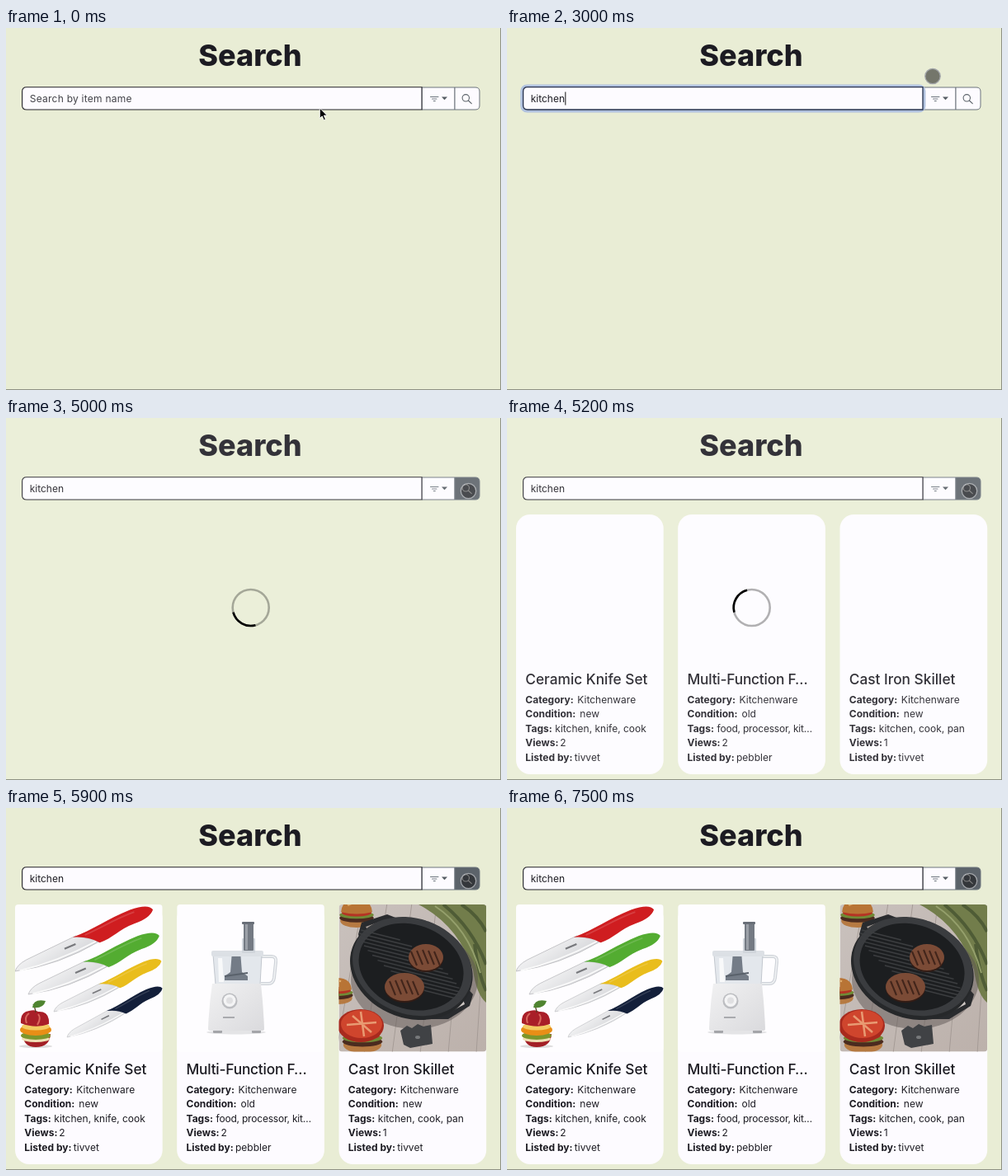
An HTML page that plays this animation: 600 by 439 pixels, repeating every 7600 ms.

```html
<!DOCTYPE html>
<html lang="en">
<head>
<meta charset="utf-8">
<title>Search</title>
<style>
  html, body { margin: 0; width: 100%; height: 100%; overflow: hidden; background: #e9edd5; }
  svg { display: block; width: 600px; height: 439px; font: 12px Inter, "Open Sans", sans-serif; fill: #1c1b22; }
  .heading { font-size: 36px; font-weight: 800; }
  .title { font-size: 17.3px; font-weight: 500; }
  .label { font-weight: 650; }
  .tight { letter-spacing: -.2px; }
</style>
</head>
<body>
<svg id="stage" viewBox="0 0 600 439" xmlns="http://www.w3.org/2000/svg"></svg>
<script>
const LOOP = 7600, STEP = 100;
const FOCUS = 500, SUBMIT = 3500, RESULTS = 5100, LOADED = 5400;
const typing = [[1600, 'k'], [1900, 'ki'], [2300, 'kit'], [2400, 'kitc'], [2500, 'kitch'], [2600, 'kitche'], [2800, 'kitchen']];

const path = (d, fill, extra = '') => `<path d="${d}" fill="${fill}" ${extra}/>`;
const line = (d, stroke, width, extra = '') => path(d, 'none', `stroke="${stroke}" stroke-width="${width}" ${extra}`);
const rect = (x, y, w, h, fill, extra = '') => `<rect x="${x}" y="${y}" width="${w}" height="${h}" fill="${fill}" ${extra}/>`;
const oval = (x, y, rx, ry, fill, extra = '') => `<ellipse cx="${x}" cy="${y}" rx="${rx}" ry="${ry}" fill="${fill}" ${extra}/>`;
const text = (x, y, value, extra = '') => `<text x="${x}" y="${y}" ${extra}>${value}</text>`;
const group = (id, body, extra = '') => `<g id="${id}" ${extra}>${body}</g>`;

// Knife pointing left, 100 units long, tip at the origin.
function knife(x, y, length, angle, color) {
  return `<g transform="translate(${x} ${y}) rotate(${angle}) scale(${length / 100})">` +
    path('M0 0Q3 -3.5 10 -4L46 -5.5L60 4Q28 8 0 0Z', 'url(#steel)', 'stroke="#b9babd" stroke-width=".4"') +
    line('M3 .8Q28 5.5 57 3.2', '#fafafa', 1) +
    rect(36, -1.2, 8, 1.2, '#77787c') +
    path('M44 -5.5C58 -4.5 70 -7.5 86 -7Q99 -6 100 -1Q96 3.5 85 2.5C74 2 68 5.5 59 5Q54 -2 44 -5.5Z', color) +
    line('M52 -3.6C65 -3.6 75 -5.5 88 -4.5', '#fff', 1, 'opacity=".15"') + '</g>';
}

function knives() {
  const fruit =
    oval(36, 289, 20, 2, '#ddd') +
    path('M20 274H54Q53 290 36 290Q21 290 20 274Z', '#a32026') +
    oval(36, 280, 17, 4, '#efdfb4') +
    oval(36, 276, 18, 5, '#7d962c') +
    oval(36, 269, 19, 7, '#e98e16') +
    oval(36, 265, 17, 4.5, '#f3cb62') +
    path('M18 261Q17 247 28 246Q35 244 39 247Q53 246 52 262Q36 268 18 261Z', '#a91f28') +
    line('M25 261Q22 253 28 249M38 263Q43 255 39 250', '#d9675c', 2) +
    line('M36 248Q35 241 33 238', '#553a20', 1.3) +
    path('M32 242Q33 231 48 234Q45 244 32 242Z', '#4f8430');
  return knife(11, 198, 183, -23.5, '#cf1d20') + knife(27, 226, 174, -23.5, '#53ac31') +
    knife(58, 247, 144, -24.5, '#e9bd1c') + knife(74, 278, 130, -26.5, '#131f3a') + fruit;
}

function processor() {
  return oval(279, 272, 36, 2.5, '#e4e4e6') +
    line('M308 180H322Q328 180 327 187L325 206Q324 213 318 213H309', '#cfd3d9', 4) +
    line('M308 180H322Q328 180 327 187L325 206Q324 213 318 213H309', '#f1f3f5', 1.6) +
    path('M251 178H310L308 214H254Z', '#e3e7ec', 'stroke="#c2c7ce"') +
    path('M257 182H262L264 211H258Z', '#f8f9fa') +
    path('M274 174H284L286 199L293 204V209H265V204L272 199Z', '#747c87') +
    line('M265 204L293 200', '#59616b', 2) +
    rect(249, 173, 63, 7, '#dce0e5', 'rx="2"') +
    rect(286, 158, 16, 18, '#d0d5db', 'rx="1"') +
    rect(288, 139, 12, 34, '#747a83', 'rx="1"') +
    rect(290, 141, 3, 31, '#9ba0a8') + rect(286, 138, 15, 3, '#686e77', 'rx="1"') +
    rect(251, 268, 11, 5, '#a4a5a9', 'rx="1"') + rect(298, 268, 11, 5, '#a4a5a9', 'rx="1"') +
    path('M250 213H309Q312 240 313 268Q313 270 310 270H248Q245 270 245 268Q246 240 250 213Z', 'url(#plastic)') +
    oval(271, 234, 9.5, 9.5, '#bcbdc1') + oval(271, 233.5, 7.5, 7.5, '#f4f4f5') + oval(271, 233.5, 4, 4, '#e0e0e2') +
    rect(263, 253, 14, 2, '#a9aaae');
}

function burger(x, y, s) {
  return `<g transform="translate(${x} ${y}) scale(${s})">` +
    oval(0, 10, 22, 9, '#b67a42') + oval(0, 6, 23, 6, '#4b2b1f') + oval(0, 2, 23, 5, '#708a36') +
    oval(0, -1, 20, 5, '#b53424') + path('M-21 -2Q-20 -19 0 -19Q20 -19 21 -2Q0 3 -21 -2Z', '#b87435') +
    line('M-12 -11Q-4 -16 6 -14', '#dcaa6c', 2.5) + '</g>';
}

function patty(x, y, rx, ry) {
  let bars = '';
  for (let i = -2; i <= 2; i++) bars += line(`M${x + i * 7 - 4} ${y - 9 + Math.abs(i)}l7 17`, '#42251b', 2);
  return oval(x, y + 2, rx, ry, '#321c15') + oval(x, y, rx, ry, '#7b4b36') + bars;
}

function skillet() {
  let planks = '', ridges = '';
  for (let i = 0; i < 7; i++) planks += line(`M${400 + i * 34} 298L${432 + i * 30} 115`, '#a59b96', 1);
  for (let i = -6; i <= 6; i++) {
    const half = 46 * Math.sqrt(1 - (i / 7) ** 2);
    ridges += line(`M${490 + i * 6 - half} ${190 + i * 6 - half * .25}l${half * 2} ${half * .5}`, '#3c3e40', 1.5);
  }
  const tilt = 'transform="rotate(20 492 193)"';
  return rect(403.5, 117, 178.7, 178.6, 'url(#wood)') + planks +
    path('M500 117H582V236Q570 226 566 196Q548 142 500 117Z', '#727d4b') +
    line('M530 117Q565 145 582 190M552 117Q572 130 582 150M568 165Q572 200 582 222', '#4f5c36', 4) +
    line('M520 119Q560 145 575 200', '#95a06c', 2) +
    burger(425, 128, .9) + burger(401, 222, .85) +
    oval(495, 208, 77, 60, '#5e5755', 'opacity=".5"') +
    path('M427 153L431 139L462 129L480 136L470 158L432 174Z', '#292b2e') +
    path('M436 144L461 135L468 139L440 150Z', '#a39a95') +
    path('M514 242L556 215L566 226L562 240L536 256L515 256Z', '#292b2e') +
    path('M527 245L554 232L556 238L535 249Z', '#cfc8c4') +
    oval(492, 195, 76, 60, '#26282a', tilt) +
    oval(492, 192, 74, 58, '#3a3c3f', tilt) +
    oval(491, 193, 65, 51, '#1c1e20', tilt) + ridges +
    patty(509, 181, 21, 16) + patty(483, 217, 24, 17) +
    burger(432, 277, 1.05) +
    oval(430, 264, 28, 20, '#a82a1e') + oval(431, 262, 25, 17, '#cf452d') +
    line('M413 263L449 260M430 247L434 277M420 252L443 272', '#e89a72', 2.5) +
    path('M478 270L486 264L492 267L499 262L506 265L515 263L517 286L490 291L482 287Z', '#404245') +
    oval(499, 278, 3, 2, '#77797b');
}

const labels = [['Category:', 63], ['Condition:', 66], ['Tags:', 36], ['Views:', 42], ['Listed by:', 59.5]];
const items = [
  { x: 11, title: 'Ceramic Knife Set', values: ['Kitchenware', 'new', 'kitchen, knife, cook', '2', 'tivvet'], art: knives },
  { x: 207.2, title: 'Multi-Function F…', values: ['Kitchenware', 'old', 'food, processor, kit…', '2', 'pebbler'], art: processor },
  { x: 403.5, title: 'Cast Iron Skillet', values: ['Kitchenware', 'new', 'kitchen, cook, pan', '1', 'tivvet'], art: skillet }
];
const tight = s => s.endsWith('…') ? 'tight' : '';

function card({ x, title, values }) {
  const left = x + 11.3;
  return rect(x, 117, 178.7, 315, '#fdfbff', 'rx="17"') +
    text(left, 322.7, title, `class="title ${tight(title)}"`) +
    labels.map(([label, offset], i) => {
      const y = 346 + i * 17.4;
      return text(left, y, label, 'class="label"') + text(left + offset, y, values[i], `class="${tight(values[i])}"`);
    }).join('');
}

const photo = ({ x, art }, i) =>
  `<clipPath id="crop${i}">${rect(x, 117, 178.7, 178.6, '#fff', 'rx="4"')}</clipPath>` +
  `<g clip-path="url(#crop${i})">${rect(x, 117, 178.7, 178.6, '#fefdff')}${art()}</g>`;

const gradient = (id, a, b) =>
  `<linearGradient id="${id}" x2="1" y2="1"><stop stop-color="${a}"/><stop offset="1" stop-color="${b}"/></linearGradient>`;

const stage = document.getElementById('stage');
stage.innerHTML =
  `<defs>${gradient('steel', '#f4f4f5', '#d6d7da')}${gradient('plastic', '#f1f1f2', '#dadadd')}${gradient('wood', '#c9c1bd', '#bcb1ab')}</defs>` +
  rect(0, 0, 600, 439, '#e9edd5') +
  text(296, 46, 'Search', 'class="heading" text-anchor="middle"') +
  path('M504 72H544V99H504Z', '#fdfbff', 'stroke="#6c757d"') +
  path('M544 72H569Q574 72 574 77V94Q574 99 569 99H544Z', '#fdfbff', 'id="button" stroke="#6c757d"') +
  line('M514.5 83.5H524M516.5 86H522M518.3 88.5H520.3', '#6c757d', 1, 'stroke-linecap="round"') +
  path('M528 83.5H535L531.5 87.3Z', '#565d64') +
  line('M561.5 84.8A4.2 4.2 0 1 1 553.1 84.8A4.2 4.2 0 1 1 561.5 84.8M560.4 88L564.3 91.7', '#5c636a', 1.1, 'id="glass" stroke-linecap="round"') +
  rect(17.8, 70, 488, 31, 'none', 'id="ring" rx="6.5" stroke="#b1c2df" stroke-width="3.2"') +
  path('M504 71.7V99H25Q19.6 99 19.6 94V77Q19.6 71.7 25 71.7Z', '#fdfbff', 'id="field"') +
  text(28.7, 89.6, 'Search by item name', 'id="hint" fill="#414147" letter-spacing=".25"') +
  text(28.7, 89.6, '', 'id="query"') +
  rect(0, 77.5, 1, 16, '#111', 'id="caret"') +
  group('results', items.map(card).join('')) +
  group('photos', items.map(photo).join('')) +
  group('touch', '<circle r="9.2" fill="#141414" fill-opacity=".55" stroke="#a2a5a9" stroke-width="1.3"/>') +
  group('arrow', path('M0 0V12.6L2.9 9.9L5 14.7L7.1 13.8L5 9.1H9Z', '#000', 'stroke="#fff" stroke-width=".9"'), 'transform="translate(380.3 97)"') +
  group('loader', rect(0, 0, 600, 439, '#fff', 'opacity=".1"') +
    '<circle cx="296.7" cy="230" r="22" fill="none" stroke="#000" stroke-opacity=".3" stroke-width="2.6"/>' +
    line('M281.14 214.44A22 22 0 0 1 312.26 214.44', '#000', 2.6, 'id="arc"')) +
  rect(599, 0, 1, 439, '#8e9183') + rect(0, 438, 600, 1, '#8e9183');

const el = id => document.getElementById(id);
const show = (id, on) => el(id).setAttribute('visibility', on ? 'visible' : 'hidden');
const set = (id, name, value) => el(id).setAttribute(name, value);

function touchPosition(t) {
  if (t >= 300 && t < 1600) return [381, 96];
  if (t >= 3000 && t < SUBMIT) return [516, 58.5];
  return t >= SUBMIT ? [560.5, 88.5] : null;
}

function render(t) {
  const focused = t >= FOCUS && t < SUBMIT;
  const submitted = t >= SUBMIT;
  const query = typing.reduce((last, [at, value]) => t >= at ? value : last, '');
  const touch = touchPosition(t);

  show('arrow', t < 300);
  show('touch', touch);
  if (touch) set('touch', 'transform', `translate(${touch})`);

  set('ring', 'opacity', focused ? Math.min(1, (t - FOCUS + STEP) / 400) : 0);
  set('field', 'stroke', focused ? '#26304d' : '#24242a');
  set('field', 'stroke-width', focused ? 1.3 : 1.1);
  show('hint', !query);
  el('query').textContent = query;
  show('caret', focused && (query || t < 1000));
  set('caret', 'x', 29 + (query ? el('query').getComputedTextLength() : 0));

  set('button', 'fill', submitted ? '#5c636a' : '#fdfbff');
  set('glass', 'stroke', submitted ? '#fff' : '#5c636a');
  show('results', t >= RESULTS);
  show('photos', t >= LOADED);
  show('loader', submitted && t < LOADED);
  set('arc', 'transform', `rotate(${120 + (t - 4000) * .45} 296.7 230)`);
}

const start = performance.now();
function tick() {
  const elapsed = (performance.now() - start) % LOOP;
  render(Math.floor(elapsed / STEP) * STEP);
  requestAnimationFrame(tick);
}
tick();
</script>
</body>
</html>
```
